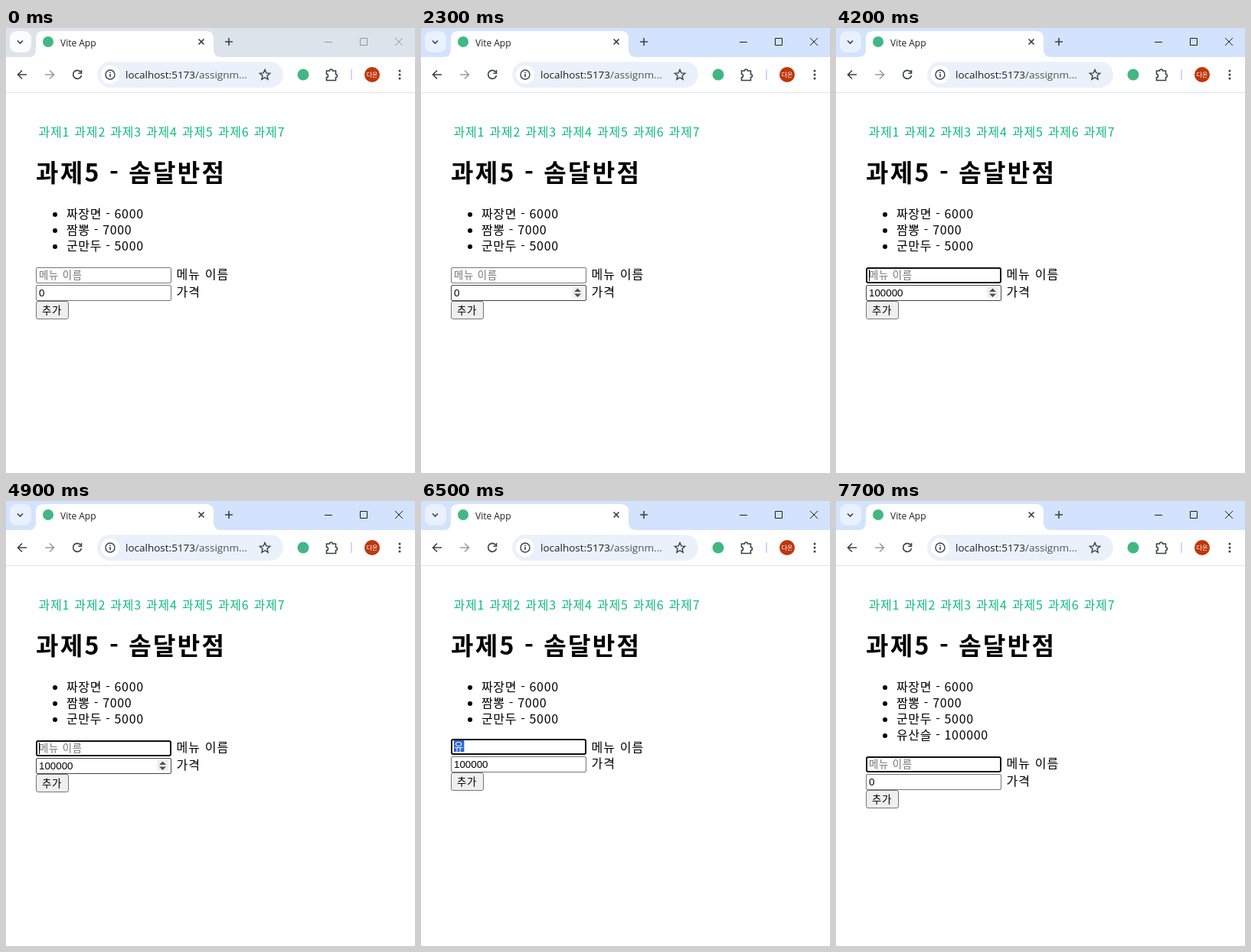
These frames come from a looping animation (534 px wide and 582 px high, 8 s). An HTML page:

```html
<!DOCTYPE html>
<html lang="ko">
<head>
<meta charset="utf-8">
<title>Vite App</title>
<style>
  html, body { margin: 0; width: 100%; height: 100%; overflow: hidden; background: #fff; }
  svg { display: block; width: 100%; height: 100%; }
  text { font: 350 16px "Noto Sans CJK KR", "Noto Sans CJK", sans-serif; letter-spacing: .8px; white-space: pre; }
  #list text { letter-spacing: .65px; }
  .label { letter-spacing: 1.1px; }
  .small { font-size: 13.33px; }
  .latin { font: 13.33px "Liberation Sans", sans-serif; letter-spacing: 0; }
  .hangul { font-size: 13.33px; letter-spacing: 1.07px; }
  .ui { font: 12px "Open Sans", "Noto Sans CJK KR", sans-serif; letter-spacing: 0; fill: #1f1f1f; }
  .icon { fill: none; stroke: #3c4043; stroke-width: 1.6; }
  .logo { fill: #41b883; }
  .selection { fill: #2f66d0; }
</style>
</head>
<body>
<svg viewBox="0 0 534 582">
  <!-- Tab strip -->
  <rect id="strip" width="534" height="38"/>
  <rect id="tabSearch" x="5" y="4" width="28" height="28" rx="9"/>
  <path class="icon" d="M15 16.5l3.500 3.500 3.500-3.500"/>
  <path fill="#fff" d="M29 38q10 0 10-10V14q0-10 10-10H261q10 0 10 10V28q0 10 10 10z"/>
  <circle class="logo" cx="55" cy="18" r="7"/>
  <text class="ui" x="71" y="24">Vite App</text>
  <path class="icon" d="M251.500 14.500l7 7m0-7l-7 7M286 18h10m-5-5v10"/>
  <path id="windowButtons" fill="none" d="M416 18.500h10M462.500 13.500h9v9h-9zM508 13l10 10m0-10l-10 10"/>

  <!-- Toolbar -->
  <rect y="38" width="534" height="46" fill="#fff"/>
  <path stroke="#dfe1e5" d="M0 84.500H534"/>
  <path class="icon" d="M27 61H15.500m5.500-5.500L15.500 61l5.500 5.500"/>
  <path class="icon" d="M51 61h11.500m-5.500-5.500l5.500 5.500-5.500 5.500" style="stroke:#9a9c9f"/>
  <path class="icon" d="M97.500 57.500A5.500 5.500 0 1 0 98.500 62M98.500 55v4.200h-4.200"/>
  <rect x="119" y="44" width="243" height="34" rx="17" fill="#ebf1fa"/>
  <circle cx="136" cy="61" r="12" fill="#fff"/>
  <circle class="icon" cx="136" cy="61" r="6" style="stroke-width:1.4"/>
  <path class="icon" d="M136 60v4m0-6.500v1.500"/>
  <text class="ui" x="156" y="66" style="font-size:13.5px">localhost:5173<tspan fill="#4f5459">/assignm...</tspan></text>
  <path id="star" class="icon" style="stroke-width:1.4"/>
  <circle class="logo" cx="388" cy="61" r="7.500"/>
  <path class="icon" d="M418.500 56h4a2 2 0 0 1 4 0h4v4.500a2 2 0 0 1 0 4V68.500h-12v-4a2 2 0 0 0 0-4.200z"/>
  <path stroke="#c7dafc" stroke-width="2" d="M451 54v14"/>
  <circle cx="478" cy="61" r="10" fill="#bf360c"/>
  <text class="ui" x="478" y="64" text-anchor="middle" style="font-size:8px;fill:#fff">다온</text>
  <g fill="#3c4043"><circle cx="514" cy="56" r="1.500"/><circle cx="514" cy="61" r="1.500"/><circle cx="514" cy="66" r="1.500"/></g>

  <!-- Page -->
  <g id="nav" fill="#10b981"></g>
  <text x="39" y="201" style="font-size:32px;font-weight:700;letter-spacing:2.3px">과제5 - 솜달반점</text>
  <g id="list"></g>

  <g id="form">
    <rect id="nameBox" fill="#fff"/>
    <text id="placeholder" class="small" x="43" y="328" fill="#757575">메뉴 이름</text>
    <rect id="composeMark" class="selection" y="315" width="13.330" height="15"/>
    <text id="nameText" x="43" y="328"></text>
    <text id="composing" class="hangul" y="328" fill="#fff"></text>
    <text id="nameLabel" class="label" x="222.500">메뉴 이름</text>

    <rect id="priceBox" fill="#fff"/>
    <rect id="priceMark" class="selection" x="43" y="339" width="7.410" height="15"/>
    <text id="priceText" class="latin" x="43" y="351"></text>
    <g id="spinner">
      <rect x="197" y="339" width="15" height="14" fill="#efefef"/>
      <rect id="spinDown" x="197" y="346" width="15" height="7" fill="#d2d2d2"/>
      <path fill="#505050" d="M200 345l4.500-4.500 4.500 4.500zM200 347.500h9l-4.500 4.500z"/>
    </g>
    <text class="label" x="222.500" y="351">가격</text>

    <rect id="button" x="39.500" y="357.500" width="42" height="23" rx="2.500"/>
    <text class="small" x="47" y="374">추가</text>
    <rect id="caret" width="1" height="15"/>
  </g>
</svg>
<script>
const LOOP = 8000, DIGIT = 7.41, SYLLABLE = 13.33;
const $ = id => document.getElementById(id);
const set = (id, attrs) => { for (const key in attrs) $(id).setAttribute(key, attrs[key]); };
const show = (id, visible) => set(id, { visibility: visible ? 'inherit' : 'hidden' });

const timeline = [
  [0, { active: false, focus: '', hover: '', pressed: false, caret: false, name: '', price: '0',
        composing: false, selected: false, spinDown: false, items: 3 }],
  [600, { hover: 'button' }],
  [700, { hover: 'price' }],
  [900, { active: true, focus: 'price', caret: true }],
  [1000, { hover: 'button' }],
  [1200, { focus: 'button', pressed: true }],
  [1400, { pressed: false }],
  [1900, { hover: 'price' }],
  [2100, { spinDown: true }],
  [2300, { spinDown: false }],
  [2400, { focus: 'price' }],
  [2600, { selected: true, caret: false }],
  [2800, { hover: 'name' }],
  [3000, { price: '1', selected: false, caret: true }],
  [3100, { price: '10' }],
  ...[3, 4, 5, 6].map(n => [3000 + n * 100, { price: '1' + '0'.repeat(n - 1) }]),
  [3900, { focus: 'name' }],
  [4200, { hover: 'price' }],
  [4300, { hover: 'button' }],
  [4400, { caret: false }],
  [4600, { hover: '' }],
  [4800, { hover: 'button' }],
  [4900, { hover: 'price', caret: true }],
  [5000, { hover: 'name' }],
  [5500, { caret: false }],
  [5900, { name: 'd', caret: true }],
  [6400, { name: '' }],
  ...['유', '윳', '유사', '유산', '유산스', '유산슬'].map((name, i) =>
    [6500 + i * 100, { name, composing: true, caret: false }]),
  [7200, { name: '', price: '0', composing: false, caret: true, hover: '', items: 4 }],
  [7700, { caret: false }]
];

function add(parent, tag, attrs, content = '') {
  const el = document.createElementNS('http://www.w3.org/2000/svg', tag);
  for (const key in attrs) el.setAttribute(key, attrs[key]);
  el.textContent = content;
  $(parent).append(el);
  return el;
}

function drawBox(id, y, focused, hovered) {
  const inset = focused ? 1 : .5;
  set(id, {
    x: 39 + inset, y: y + inset, width: 177 - 2 * inset, height: 21 - 2 * inset, rx: focused ? 2 : 1.5,
    stroke: focused ? '#101010' : hovered ? '#454545' : '#767676', 'stroke-width': 2 * inset
  });
}

for (let i = 0; i < 7; i++) add('nav', 'text', { x: 42.5 + i * 46.85, y: 142 }, '과제' + (i + 1));

const menu = ['짜장면 - 6000', '짬뽕 - 7000', '군만두 - 5000', '유산슬 - 100000'].map((item, i) => [
  add('list', 'circle', { cx: 64, cy: 244 + i * 21, r: 3 }),
  add('list', 'text', { x: 79, y: 249 + i * 21 }, item)
]);

set('star', { d: 'M' + Array.from({ length: 10 }, (_, i) => {
  const angle = i * Math.PI / 5, radius = i % 2 ? 3.2 : 7;
  return [338 + radius * Math.sin(angle), 61.5 - radius * Math.cos(angle)].map(v => v.toFixed(1));
}).join('L') + 'z' });

function render(t) {
  const s = Object.assign({}, ...timeline.filter(([start]) => start <= t).map(([, change]) => change));
  const lift = s.composing ? 2 : 0;

  set('strip', { fill: s.active ? '#d3e2fd' : '#dde3ea' });
  set('tabSearch', { fill: s.active ? '#e9f1fe' : '#fafcfd' });
  set('windowButtons', { stroke: s.active ? '#1f1f1f' : '#91969b' });
  menu.forEach((parts, i) => parts.forEach(el =>
    el.setAttribute('visibility', i < s.items ? 'visible' : 'hidden')));
  set('form', { transform: `translate(0 ${(s.items - 3) * 21 - lift})` });

  drawBox('nameBox', 313, s.focus === 'name', s.hover === 'name');
  drawBox('priceBox', 336, s.focus === 'price', s.hover === 'price');
  set('nameLabel', { y: 328 + lift });
  show('placeholder', !s.name);

  const done = s.composing ? s.name.slice(0, -1) : s.name;
  const composeX = 43 + done.length * SYLLABLE;
  $('nameText').textContent = done;
  set('nameText', { class: s.composing ? 'hangul' : 'latin' });
  $('composing').textContent = s.composing ? s.name.slice(-1) : '';
  set('composing', { x: composeX });
  set('composeMark', { x: composeX });
  show('composeMark', s.composing);

  $('priceText').textContent = s.price;
  set('priceText', { fill: s.selected ? '#fff' : '#000' });
  show('priceMark', s.selected);
  show('spinner', s.hover === 'price' || s.focus === 'price');
  show('spinDown', s.spinDown);

  const hot = s.hover === 'button';
  set('button', { fill: s.pressed ? '#f5f5f5' : hot ? '#e5e5e5' : '#efefef',
                  stroke: s.pressed ? '#8d8d8d' : hot ? '#4f4f4f' : '#767676' });

  const inName = s.focus === 'name';
  set('caret', { x: 43 + Math.floor((inName ? s.name : s.price).length * DIGIT), y: inName ? 316 : 339 });
  show('caret', s.caret && (inName || s.focus === 'price'));
}

function tick() {
  render(performance.now() % LOOP);
  requestAnimationFrame(tick);
}
tick();
</script>
</body>
</html>
```
